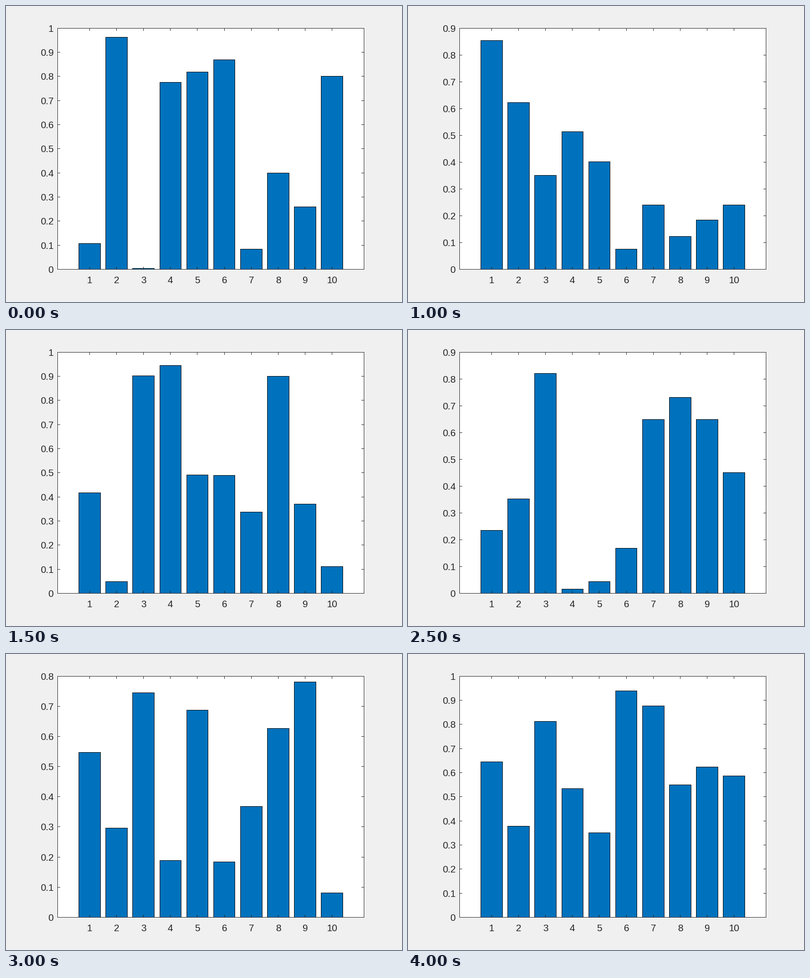
A matplotlib script that plays this animation: 840 px wide and 630 px high, repeating every 4500 ms.

```python
import math
import numpy as np
import matplotlib.pyplot as plt
from matplotlib.animation import FuncAnimation
from matplotlib.patches import Rectangle

W, H, DPI = 840, 630, 100
STEPS, BARS, INTERVAL = 9, 10, 500
LEFT, RIGHT, TOP, BOTTOM = 109, 759, 47, 560
UNIT = 651 / 11.4            # pixels per x unit, axis starts at -0.2
X0, Y0, SPAN = 109.02, 560.52, 513.45
TICK = 6
INK, BLUE = "#262626", "#0072BD"
FONT = dict(family="Liberation Sans", size=20.4 * 72 / DPI, color=INK)

# Mersenne Twister stream; the first twelve rows are skipped
data = np.random.RandomState(5489).rand(12 + STEPS, BARS)[12:]

fig = plt.figure(figsize=(W / DPI, H / DPI), dpi=DPI, facecolor="#F0F0F0")
ax = fig.add_axes([0, 0, 1, 1])
ax.set_xlim(0, W)
ax.set_ylim(H, 0)
ax.axis("off")


def x_px(v):
    return math.floor(X0 + (v + 0.2) * UNIT)


def y_px(frac):
    return math.floor(Y0 - frac * SPAN)


def box(x, y, w, h, color, z):
    return ax.add_patch(Rectangle((x, y), w, h, facecolor=color, linewidth=0,
                                  antialiased=False, zorder=z))


def set_span(patch, top, bottom):
    patch.set_y(top)
    patch.set_height(max(bottom - top, 0))


box(LEFT, TOP, RIGHT - LEFT + 1, BOTTOM - TOP + 1, "white", 0)

bars = []
for i in range(1, BARS + 1):
    left, right = x_px(i - 0.4), x_px(i + 0.4)
    edge = box(left, BOTTOM, right - left + 1, 1, "black", 1)
    fill = box(left + 1, BOTTOM, right - left - 1, 0, BLUE, 2)
    bars.append((edge, fill))
    mid = x_px(i)
    box(mid, TOP, 1, TICK, INK, 3)
    box(mid, BOTTOM - TICK + 1, 1, TICK, INK, 3)
    ax.text(mid + 0.5, 590, str(i), ha="center", va="baseline", **FONT)

for y in (TOP, BOTTOM):
    box(LEFT, y, RIGHT - LEFT + 1, 1, INK, 3)
for x in (LEFT, RIGHT):
    box(x, TOP, 1, BOTTOM - TOP + 1, INK, 3)

y_ticks = []
for k in range(11):
    marks = [box(x, BOTTOM, TICK, 1, INK, 3) for x in (LEFT, RIGHT - TICK + 1)]
    label = ax.text(101, BOTTOM, f"{k / 10:g}", ha="right", va="baseline", **FONT)
    y_ticks.append((marks, label))


def draw(n):
    values = data[n]
    top = math.ceil(values.max() * 10)   # y limit in tenths
    for v, (edge, fill) in zip(values, bars):
        y = y_px(v * 10 / top)
        set_span(edge, y, BOTTOM + 1)
        set_span(fill, y + 1, BOTTOM)
    for k, (marks, label) in enumerate(y_ticks):
        shown = k <= top
        y = y_px(k / top)
        for m in marks:
            m.set_y(y)
            m.set_visible(shown)
        label.set_y(y + 8)
        label.set_visible(shown)
    return []


anim = FuncAnimation(fig, draw, frames=STEPS, init_func=lambda: draw(0),
                     interval=INTERVAL, repeat=True, repeat_delay=0, blit=False)
plt.show()
```
